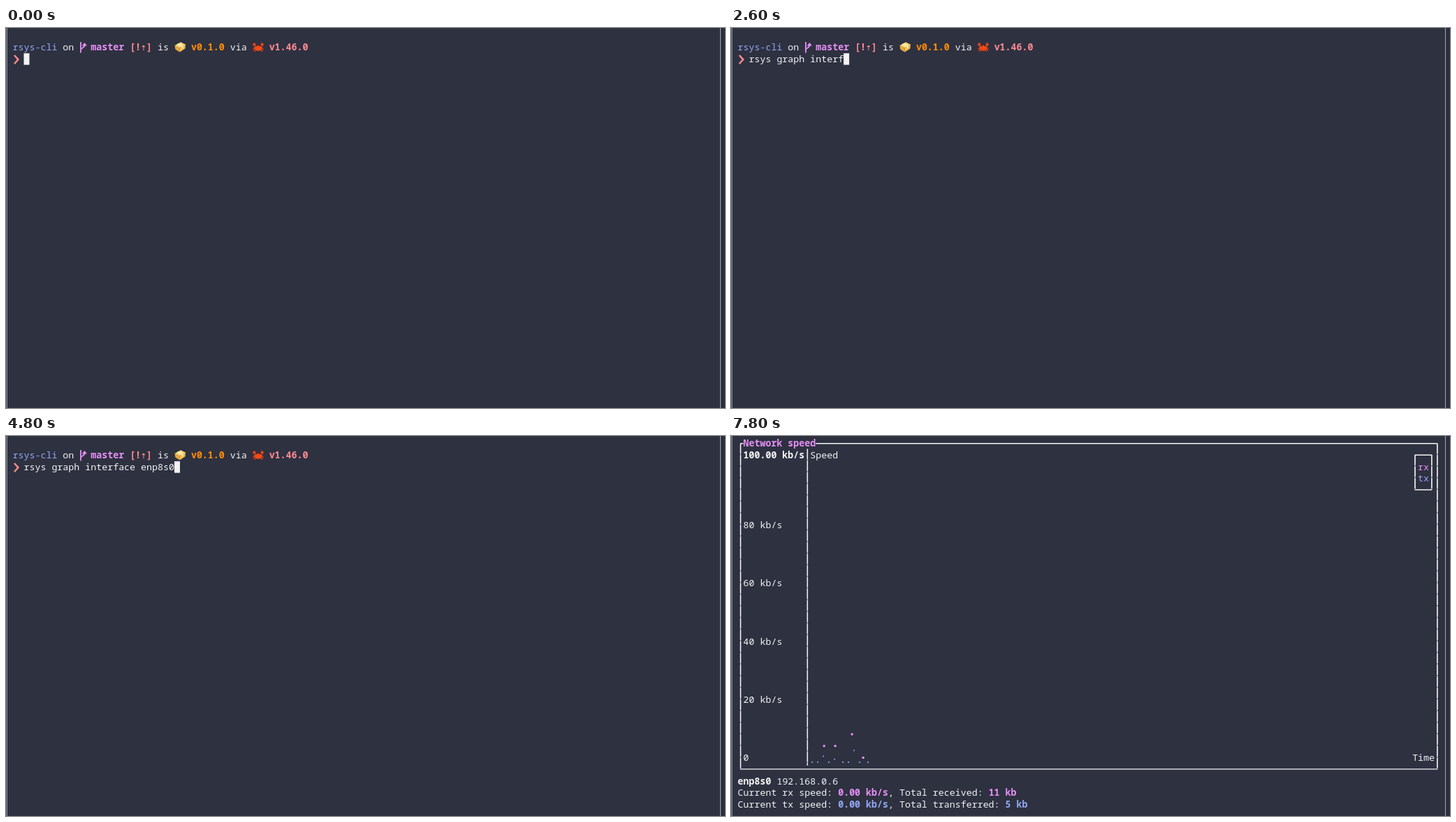
An HTML page that plays this animation: 1029x544 px, repeating every 8 s.

```html
<!DOCTYPE html>
<html lang="en">
<head>
<meta charset="utf-8">
<title>Network speed in a terminal</title>
<style>
  html, body { margin: 0; width: 100%; height: 100%; overflow: hidden; background: #2e3140; }
  svg { display: block; width: 1029px; height: 544px; }
  text { font: 13.3px "Noto Sans Mono", "DejaVu Sans Mono", monospace; white-space: pre; }
  .bold { font-weight: 700; }
</style>
</head>
<body>
<svg id="stage" viewBox="0 0 1029 544">
  <rect width="1029" height="544" fill="#2e3140"/>
  <rect x="1023" width="6" height="544" fill="#2b2f3b"/>
  <path d="M1.3 0V544M1022.5 0V544" stroke="#9da1ae" stroke-width="1.1"/>
  <g id="screen"></g>
</svg>
<script>
const LOOP = 8000;
const CELL_W = 7.98, CELL_H = 16.664, LEFT = 9.55, TOP = 2.7;
const WHITE = "#f3f3f5", PINK = "#e58ff4", BLUE = "#93a7f3", RED = "#ff8b91", ORANGE = "#ff8c08";

const colX = col => LEFT + col * CELL_W;
const rowY = row => TOP + row * CELL_H;

const write = (row, col, str, color = WHITE, bold = false) =>
  `<text x="${colX(col).toFixed(2)}" y="${(rowY(row) + 12.6).toFixed(2)}" fill="${color}"` +
  `${bold ? ' class="bold"' : ""}>${str}</text>`;

// Writes [text, color, bold] parts one after another.
function writeRun(row, parts) {
  let col = 0;
  return parts.map(([str, color, bold]) => {
    const out = write(row, col, str, color, bold);
    col += str.length;
    return out;
  }).join("");
}

const shape = (d, fill) => `<path d="${d}" fill="${fill}"/>`;
const stroke = (d, color, width) =>
  `<path d="${d}" fill="none" stroke="${color}" stroke-width="${width}"/>`;
const dot = (x, y, r, color) => `<circle cx="${x}" cy="${y}" r="${r}" fill="${color}"/>`;

// Vertical border whose joints between rows are slightly dimmer.
const vertical = (x, y1, y2) => {
  const d = `M${x} ${y1}V${y2}`;
  return `<path d="${d}" stroke="#b6b8c1" stroke-width="1.3"/>` +
    `<path d="${d}" stroke="${WHITE}" stroke-width="1.4" stroke-dasharray="14.664 2"/>`;
};

// Typing: characters of the base command, then the interface name with its correction.
const COMMAND = "rsys graph interface ";
const KEY_TIMES = [300, 500, 600, 700, 900, 1000, 1200, 1300, 1500, 1600, 1800,
  2000, 2100, 2200, 2300, 2400, 2600, 2700, 2900, 3000, 3100];
const EDITS = [[3300, "ne"], [3700, "n"], [3900, ""], [4000, "e"], [4100, "en"],
  [4200, "enp"], [4500, "enp8"], [4700, "enp8s"], [4800, "enp8s0"]];
const GRAPH_START = 5100, SAMPLE_TIME = 300;

function typedAt(t) {
  const base = COMMAND.slice(0, KEY_TIMES.filter(k => k <= t).length);
  const edit = EDITS.filter(([at]) => at <= t).pop();
  return base + (edit ? edit[1] : "");
}

const branchIcon =
  stroke("M107 20V35.5M107 31.5C107.2 27.5 112.6 29.5 112.7 24", PINK, 1.8) +
  shape("M108.6 25.6L112.4 21L116 25.6Z", PINK);

const packageIcon =
  shape("M241.5 25L250 20.3L257 23.6L248.5 28.5Z", "#ffd978") +
  shape("M241.5 25L248.5 28.5V34.5L242.3 30.5Z", "#e9a83c") +
  shape("M248.5 28.5L257 23.6L256.3 29.5L248.5 34.5Z", "#f5bd55") +
  shape("M244.7 23.2L246.7 22.1L253.6 25.5V28.2L251.6 29.4V26.7Z", "#fff0be");

const crabIcon =
  stroke("M356 28L353.6 30M356.2 30L354 32.5M357.5 31.5L356 34M366 28L368.4 30" +
    "M365.8 30L368 32.5M364.5 31.5L366 34M356 26L354.3 24M366 26L367.7 24", "#d83a10", 1.4) +
  `<ellipse cx="361" cy="28.6" rx="5.5" ry="4.2" fill="#f04a18"/>` +
  shape("M354 25.5Q351.8 22 356.6 20.5L355.5 22.7L358.2 22.4Q357.4 25.5 354 25.5Z", "#f04a18") +
  shape("M368 25.5Q370.2 22 365.4 20.5L366.5 22.7L363.8 22.4Q364.6 25.5 368 25.5Z", "#f04a18") +
  dot(359.2, 25, 1, "#3b1610") + dot(362.8, 25, 1, "#3b1610");

const prompt =
  write(1, 0, "rsys-cli", BLUE) + write(1, 9, "on") + branchIcon +
  write(1, 14, "master", PINK, true) + write(1, 21, "[!⇡]", RED, true) +
  write(1, 26, "is") + packageIcon + write(1, 32, "v0.1.0", ORANGE, true) +
  write(1, 39, "via") + crabIcon + write(1, 46, "v1.46.0", RED, true) +
  stroke("M11.9 39L17.4 45.1L11.9 51.2", RED, 2.4);

function shellView(typed) {
  const x = colX(2 + typed.length);
  return prompt + write(2, 2, typed) +
    `<rect x="${x}" y="36.2" width="${CELL_W}" height="16.5" fill="${WHITE}"/>`;
}

const chart =
  stroke("M13.6 10.7H17.4M121.3 10.7H1011.2M13 476.9H1011.2M978.6 27.2H1003.2M978.6 77H1003.2", WHITE, 1.4) +
  vertical(13.6, 10.7, 476.9) + vertical(1010.8, 10.7, 476.9) + vertical(109.4, 18.6, 471.5) +
  vertical(978.9, 27, 77) + vertical(1002.8, 27, 77) +
  write(0, 1, "Network speed", PINK, true) +
  write(1, 1, "100.00 kb/s", WHITE, true) + write(1, 13, "Speed") +
  [80, 60, 40, 20].map((v, i) => write(7 + 5 * i, 1, v + " kb/s")).join("") +
  write(27, 1, "0") + write(27, 121, "Time") +
  write(2, 122, "rx", PINK) + write(3, 122, "tx", BLUE) +
  write(29, 0, "enp8s0", WHITE, true) + write(29, 7, "192.168.0.6");

// tx: half-column and level in quarter rows; rx: [column, row] of a visible dot.
const IDLE = ["0.00", "0.00"];
const SAMPLES = [
  { tx: [0, 0], speed: IDLE, total: [0, 0] },
  { tx: [2, 0], speed: IDLE, total: [0, 0] },
  { tx: [4, 2], rx: [15, 26], speed: ["0.68", "0.95"], total: [2, 1] },
  { tx: [6, 0], speed: IDLE, total: [2, 1] },
  { tx: [8, 1], rx: [17, 26], speed: ["0.72", "0.64"], total: [4, 2] },
  { tx: [11, 0], speed: IDLE, total: [4, 2] },
  { tx: [13, 0], speed: IDLE, total: [4, 2] },
  { tx: [15, 4], rx: [20, 25], speed: ["1.82", "1.15"], total: [11, 5] },
  { tx: [17, 0], speed: IDLE, total: [11, 5] },
  { tx: [20, 0], rx: [22, 27], speed: IDLE, total: [11, 5] },
];

function plot({ tx: [half, level], rx }) {
  const x = colX(13) + half * CELL_W / 2 + 2.95;
  const point = dot(x, 466.9 - level * CELL_H / 4, 1.05, "#8ca5e8");
  return point + (rx ? dot(colX(rx[0] + .5), rowY(rx[1]) + 7.8, 1.75, PINK) : "");
}

function graphView(count) {
  const { speed, total } = SAMPLES[count - 1];
  const footer = (row, name, verb, i, color) => writeRun(row, [
    [`Current ${name} speed: `], [`${speed[i]} kb/s`, color, true],
    [`, Total ${verb}: `], [`${total[i]} kb`, color, true],
  ]);
  return chart + SAMPLES.slice(0, count).map(plot).join("") +
    footer(30, "rx", "received", 0, PINK) + footer(31, "tx", "transferred", 1, BLUE);
}

const screenGroup = document.getElementById("screen");
let shown = null;

function draw() {
  const t = performance.now() % LOOP;
  const samples = Math.min(SAMPLES.length, Math.floor((t - GRAPH_START) / SAMPLE_TIME) + 1);
  const state = samples > 0 ? samples : typedAt(t);
  if (state !== shown) {
    screenGroup.innerHTML = samples > 0 ? graphView(samples) : shellView(state);
    shown = state;
  }
  requestAnimationFrame(draw);
}
draw();
</script>
</body>
</html>
```
